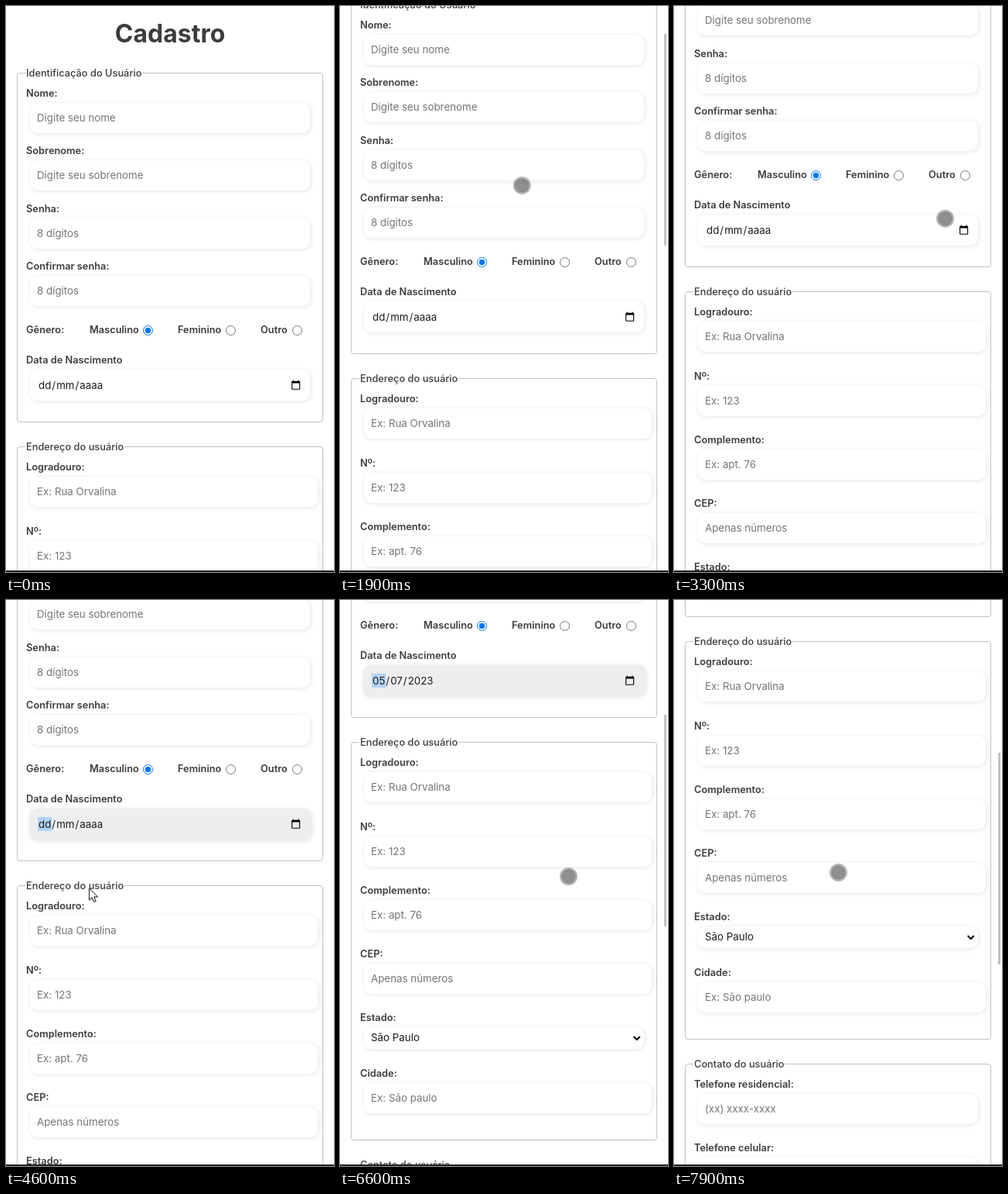
Write an HTML page that moves like this. It is 424 by 730 pixels and loops after 8000 ms.

```html
<!DOCTYPE html>
<html lang="pt-BR">
<head>
<meta charset="utf-8">
<title>Cadastro</title>
<style>
html, body { margin: 0; width: 100%; height: 100%; overflow: hidden; background: #fff; }
body { position: relative; font: 13.333px Inter, sans-serif; color: #3c3c3c; }
div, svg { position: absolute; box-sizing: border-box; }
#page { left: 0; top: 0; width: 424px; height: 1400px; will-change: transform; }
.title { top: 16px; width: 424px; text-align: center; font: bold 32px/39px Inter, sans-serif; }
.label, .legend { font-size: 12.8px; line-height: 21px; white-space: nowrap; font-weight: 600; }
.legend { font-weight: 500; background: #fff; padding: 0 1px; }
.set { left: 14px; width: 396px; border: 1px solid #c0c0c0; border-radius: 4px; }
.box { left: 31px; border-radius: 10px; background: #fff; box-shadow: 1px 1px 6px #0000001c; }
.text { line-height: 20px; white-space: nowrap; color: #757575; }
.dark { color: #1c1c1c; }
.radio { width: 13px; height: 13px; border: 1px solid #767676; border-radius: 50%; }
.radio.on { border: 1.5px solid #0075ff; background: radial-gradient(#0075ff 3.4px, #fff 4.1px); }
#date span { padding: 1px; }
.box.focus { left: 30px; width: 365px !important; height: 41px !important; background: #eee; }
#date.focus span:first-child { background: #b1d3f8; }
#bar { left: 419px; top: 0; width: 3px; height: 273px; background: #c1c1c1; }
#edge { left: 0; top: 728px; width: 100%; height: 2px; background: #232323; }
#touch { left: -11.5px; top: -11.5px; width: 23px; height: 23px; border-radius: 50%;
  border: 2px solid #00000048; background: #00000070 padding-box; }
#arrow { left: 0; top: 0; }
</style>
</head>
<body>
<div id="page"></div>
<div id="bar"></div>
<div id="touch"></div>
<svg id="arrow" width="14" height="20"><path d="M.5 .7V16l3.6-3.4 2.5 5.8 2.5-1.1-2.5-5.5h4.9z" fill="#fff" stroke="#111"/></svg>
<div id="edge"></div>
<script>
const $ = id => document.getElementById(id);
const page = $('page');

function add(cls, x, y, html = '', w, h) {
  const el = document.createElement('div');
  el.className = cls;
  if (x != null) el.style.left = x + 'px';
  el.style.top = y + 'px';
  if (w) el.style.width = w + 'px';
  if (h) el.style.height = h + 'px';
  el.innerHTML = html;
  page.append(el);
  return el;
}
const label = (text, y, x = 26) => add('label', x, y - 10, text);
const box = (y, w, h = 39) => add('box', null, y, '', w, h);
function field(name, y, hint, w = 362) {
  label(name, y);
  box(y + 13, w);
  add('text', 40, y + 22, hint);
}
function section(name, y, h) {
  add('set', null, y, '', 0, h);
  add('legend', 25, y - 10, name);
}
function radio(name, x, cx, on) {
  label(name, 417, x);
  add('radio' + (on ? ' on' : ''), cx - 6.5, 412);
}

add('title', 0, 16, 'Cadastro');
section('Identificação do Usuário', 86, 451);
field('Nome:', 112, 'Digite seu nome');
field('Sobrenome:', 186, 'Digite seu sobrenome');
field('Senha:', 261, '8 dígitos');
field('Confirmar senha:', 335, '8 dígitos');
label('Gênero:', 417);
radio('Masculino', 108, 183.5, true);
radio('Feminino', 222, 290.5);
radio('Outro', 329, 376.5);
label('Data de Nascimento', 456);
const dateBox = box(469, 362, 40);
const date = add('text dark', 41, 479);
date.id = 'date';
add('', 368, 482, `<svg width="13.3" height="13.3" viewBox="0 0 24 24"><path d="M20 3h-1V1h-2v2H7V1H5v2H4
  c-1.1 0-2 .9-2 2v16c0 1.1.9 2 2 2h16c1.1 0 2-.9 2-2V5c0-1.1-.9-2-2-2zm0 18H4V8h16v13z"/></svg>`);

section('Endereço do usuário', 568, 514);
field('Logradouro:', 594, 'Ex: Rua Orvalina', 372);
field('Nº:', 677, 'Ex: 123', 372);
field('Complemento:', 759, 'Ex: apt. 76', 372);
field('CEP:', 841, 'Apenas números', 372);
label('Estado:', 923);
box(936, 362, 28);
add('text dark', 40, 939, 'São Paulo');
add('', 378, 946, '<svg width="12" height="9"><path d="M1.7 2l4 4 4-4" fill="none" stroke="#000" stroke-width="2"/></svg>');
field('Cidade:', 995, 'Ex: São paulo', 372);

section('Contato do usuário', 1113, 400);
field('Telefone residencial:', 1139, '(xx) xxxx-xxxx');
field('Telefone celular:', 1221, '(xx) xxxxx-xxxx');

// Keys: [time, value, ...]
const scrollKeys = [[1700, 0], [1950, 110], [2200, 197], [2300, 200], [6100, 200], [6200, 201],
  [6400, 300], [6600, 385], [6750, 401], [7350, 401], [7650, 490], [7900, 515]];
const barKeys = [[1650, 0], [1750, 1], [2800, 1], [3100, 0], [6080, 0], [6180, 1]];
const pointerKeys = [[600, -14, 300], [1250, 211, 235], [1700, 211, 235], [2200, 270, 225],
  [2800, 290, 235], [3500, 374, 289], [3950, 374, 289], [4600, 107, 371], [5000, 150, 420],
  [5300, 155, 425], [5800, 260, 360], [6200, 275, 356], [6600, 295, 356], [7200, 290, 356], [7900, 212, 351]];

function at(keys, t) {
  const i = keys.findIndex(k => k[0] > t);
  if (i < 0) return keys.at(-1).slice(1);
  if (i === 0) return keys[0].slice(1);
  const a = keys[i - 1], b = keys[i], p = (t - a[0]) / (b[0] - a[0]);
  return a.slice(1).map((v, j) => v + (b[j + 1] - v) * p);
}

let shown;
function setDate(text) {
  if (text === shown) return;
  shown = text;
  date.innerHTML = text.split('/').map(part => `<span>${part}</span>`).join('/');
}

function draw(now) {
  const t = now % 8000;
  const scroll = Math.round(at(scrollKeys, t)[0]);
  const [x, y] = at(pointerKeys, t);
  const arrow = t >= 3950 && t < 5400;
  const move = `translate(${x}px, ${y}px)`;
  page.style.transform = `translateY(${-scroll}px)`;
  $('bar').style.transform = `translateY(${Math.round(2.7 + scroll * .377)}px)`;
  $('bar').style.opacity = at(barKeys, t)[0];
  $('touch').style.transform = $('arrow').style.transform = move;
  $('touch').style.visibility = arrow ? 'hidden' : 'visible';
  $('arrow').style.visibility = arrow ? 'visible' : 'hidden';
  dateBox.classList.toggle('focus', t >= 3900);
  date.classList.toggle('focus', t >= 3900);
  setDate(t < 5100 ? 'dd/mm/aaaa' : '05/07/2023');
  requestAnimationFrame(draw);
}
requestAnimationFrame(draw);
</script>
</body>
</html>
```
